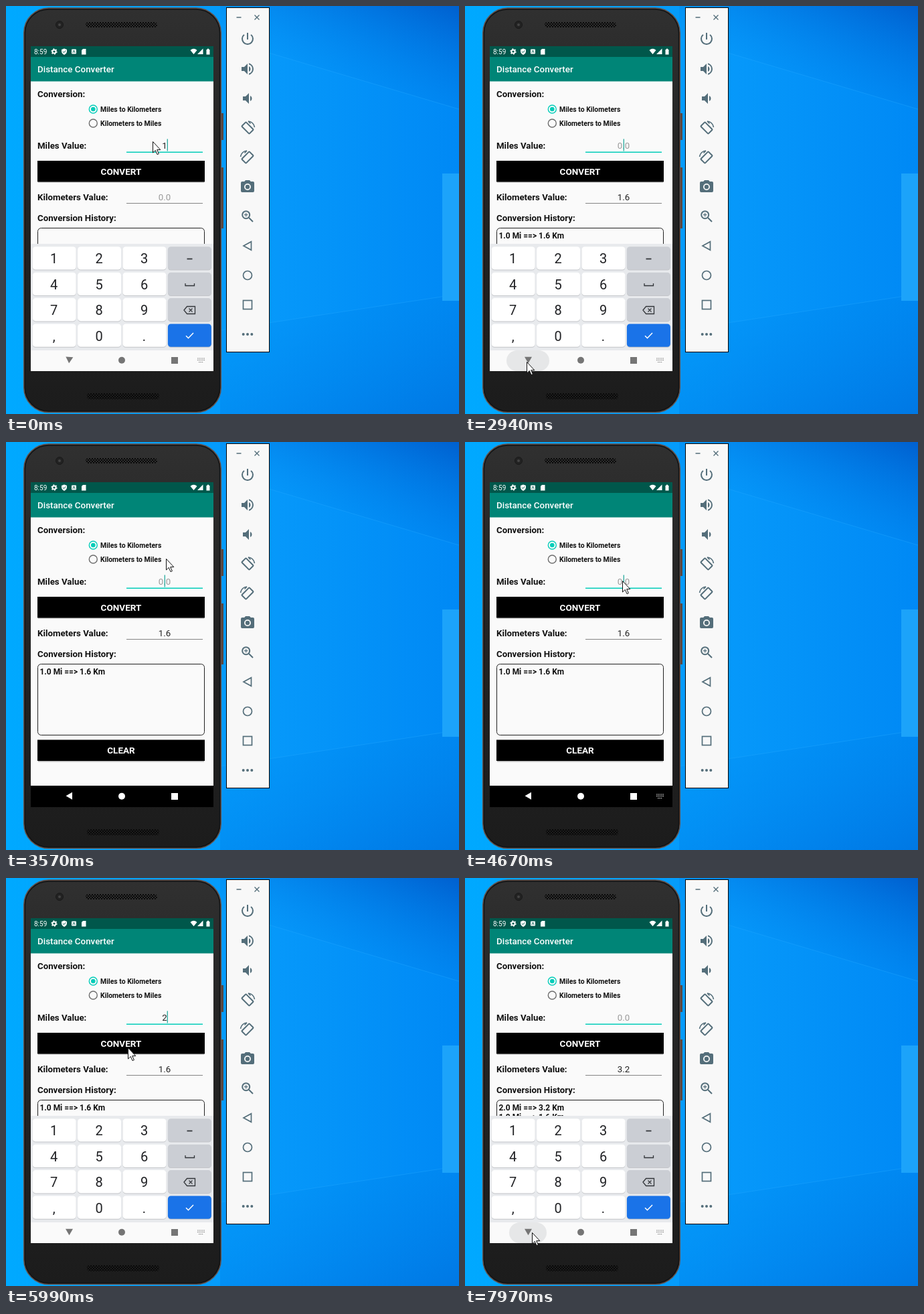
These frames come from a looping animation (677x609 px, 8 s). An HTML page:

```html
<!DOCTYPE html>
<html lang="en">
<head>
<meta charset="utf-8">
<title>Distance Converter</title>
<style>
  html, body { margin: 0; width: 100%; height: 100%; overflow: hidden; background: #0892f8; }
  svg { display: block; font-family: Roboto, sans-serif; }
  .label { font-weight: 700; font-size: 13.28px; fill: #111; }
  .option { font-weight: 700; font-size: 10.45px; fill: #111; }
  .entry { font-weight: 700; font-size: 11.95px; fill: #111; }
  .button { font-weight: 700; font-size: 13.5px; fill: #fff; text-anchor: middle; }
  .value { font-size: 13.28px; text-anchor: middle; }
  .key { font-size: 20px; fill: #202124; text-anchor: middle; }
  .line { fill: none; stroke: #546e7a; stroke-width: 2; }
</style>
</head>
<body>
<svg width="677" height="609" viewBox="0 0 677 609">
  <defs>
    <linearGradient id="sky"><stop stop-color="#00a9ff"/><stop offset=".6" stop-color="#0698fa"/><stop offset="1" stop-color="#0089f5"/></linearGradient>
    <linearGradient id="dusk" x1="0" y1="1" x2="1" y2="0"><stop offset=".3" stop-color="#0088f0" stop-opacity="0"/><stop offset="1" stop-color="#0060cf"/></linearGradient>
    <linearGradient id="floor" x1="0" y1="0" x2="1" y2="1"><stop stop-color="#0094f8" stop-opacity=".2"/><stop offset="1" stop-color="#0078e4"/></linearGradient>
    <linearGradient id="shell" x2="0" y2="1"><stop stop-color="#303030"/><stop offset=".3" stop-color="#262626"/><stop offset="1" stop-color="#1c1c1c"/></linearGradient>
    <pattern id="mesh" width="4" height="4" patternUnits="userSpaceOnUse"><path d="M0 0h2v2H0zM2 2h2v2H2z" fill="#090909"/></pattern>
  </defs>

  <!-- desktop -->
  <rect width="677" height="609" fill="url(#sky)"/>
  <path d="M320 0H677V154L393 70 320 48z" fill="url(#dusk)"/>
  <path d="M320 484L677 430V609H320z" fill="url(#floor)"/>
  <path d="M393 70L677 154M320 484L677 430" stroke="#25a8ff" stroke-opacity=".4"/>
  <rect x="652" y="250" width="190" height="190" fill="#1ca3fa"/>

  <!-- phone -->
  <path d="M320 160h5v40h-5zM320 241h5v91h-5z" fill="#594742"/>
  <rect x="26.7" y="3" width="294.6" height="603.5" rx="37" fill="url(#shell)" stroke="#63534e" stroke-width="1.5"/>
  <rect x="28.5" y="5" width="291" height="599.5" rx="35" fill="none" stroke="#141414" stroke-width="1.5"/>
  <circle cx="80" cy="28" r="5.5" fill="#222" stroke="#191919"/><circle cx="80" cy="28" r="2" fill="#444"/>
  <g fill="url(#mesh)"><rect x="119" y="24" width="107" height="8" rx="4"/><rect x="121" y="578" width="108" height="9" rx="4"/></g>

  <!-- app -->
  <rect x="37" y="60" width="273" height="485" fill="#fafafa"/>
  <rect x="37" y="60" width="273" height="16" fill="#00574b"/>
  <rect x="37" y="76" width="273" height="36.5" fill="#008577"/>
  <g fill="#fff">
    <text x="42" y="71.7" font-size="10">8:59</text>
    <circle cx="72" cy="68" r="2.6" fill="none" stroke="#fff" stroke-width="2"/>
    <circle cx="72" cy="68" r="4" fill="none" stroke="#fff" stroke-width="1.3" stroke-dasharray="1.8 2.39"/>
    <path d="M87 63.5l4 1.5v3c0 2-2 4-4 5-2-1-4-3-4-5v-3z"/><path d="M85 68l1.5 1.5 2.8-3" fill="none" stroke="#00574b"/>
    <rect x="98" y="64.5" width="7" height="7" rx="1"/><path d="M99.8 70l1.7-4 1.7 4" fill="none" stroke="#00574b" stroke-width=".9"/>
    <path d="M115 64h4.5v8.5h-6.5v-6.5z"/>
    <path d="M275.5 66q5-4.5 10 0l-5 6zM294.500 63.500v8.500h-8.500zM299.500 65h1.300v-1.200h2.400v1.200h1.300v7.500h-5z"/>
    <text x="47" y="99.300" font-size="13.400" font-weight="500">Distance Converter</text>
  </g>
  <text class="label" x="47" y="136">Conversion:</text>
  <circle cx="130.300" cy="154" r="6" fill="none" stroke="#03cdb9" stroke-width="1.400"/><circle cx="130.300" cy="154" r="3.300" fill="#03cdb9"/>
  <circle cx="130.300" cy="175" r="6" fill="none" stroke="#6d6d6d" stroke-width="1.400"/>
  <text class="option" x="141" y="157.700">Miles to Kilometers</text>
  <text class="option" x="141" y="178.800">Kilometers to Miles</text>
  <text class="label" x="47" y="213">Miles Value:</text>
  <text class="label" x="47" y="289.800">Kilometers Value:</text>
  <text class="label" x="47" y="321">Conversion History:</text>
  <path d="M180 218.300h114" stroke="#03cdb9" stroke-width="1.500"/>
  <path d="M180 294.500h114" stroke="#858585"/>
  <text class="value" id="miles" x="237" y="213"/>
  <rect id="caret" y="198.500" width="1.400" height="18" fill="#35afa4"/>
  <text class="value" id="kilometers" x="237" y="289.800"/>
  <path id="shadow" d="M48 262h248v1.500H48z" fill="#bbb"/>
  <rect x="47" y="231" width="250" height="31.500"/><text class="button" x="172" y="251.500">CONVERT</text>
  <rect x="47.500" y="331.500" width="249" height="106" rx="5" fill="none" stroke="#222"/>
  <text class="entry" x="50.500" y="347.300" id="newest"/><text class="entry" x="50.500" y="360.800" id="older"/>
  <path d="M48 476h248v1.500H48z" fill="#bbb"/>
  <rect x="47" y="444.500" width="250" height="31.500"/><text class="button" x="172" y="465">CLEAR</text>

  <!-- keyboard -->
  <g id="keyboard">
    <rect x="37" y="355" width="273" height="160" fill="#e8eaed"/>
    <g id="keys"/>
    <g fill="none" stroke="#33363a" stroke-width="1.300">
      <path d="M270.500 377.500h8" stroke-width="1.800"/>
      <path d="M268 414v3.500h13.500v-3.500"/>
      <path d="M266 454l4.500-5.500h12v11h-12zM273.500 451.500l5 5m0-5l-5 5"/>
      <path d="M269 492.300l3.500 3.500 7.500-7.800" stroke="#fff" stroke-width="1.500"/>
    </g>
  </g>
  <rect id="navbar" x="37" width="273"/>
  <rect id="ripple" y="514" height="31" rx="16" fill="#e6e7e8"/>
  <g id="nav">
    <path id="back" d="M-5.500-4.500h11L0 5z"/>
    <circle cx="173" cy="528.700" r="5"/><rect x="247" y="524" width="10" height="10"/>
    <path id="switcher" d="M286 526h11M286 528.500h11M288 531.500h7" fill="none" stroke-width="1.200" stroke-dasharray="1.400 1"/>
  </g>

  <!-- emulator toolbar -->
  <rect x="329.500" y="2.500" width="64" height="514" fill="#f8f8f8" stroke="#000"/>
  <path class="line" style="stroke-width:1.400" d="M344.500 17h7M371.500 13.500l7 7m0-7l-7 7"/>
  <g fill="#546e7a">
    <path transform="translate(349 37)" d="M13 3h-2v10h2zm4.830 2.170l-1.420 1.420A7 7 0 1 1 7.580 6.580L6.170 5.170a9 9 0 1 0 11.660 0z"/>
    <path transform="translate(349 82)" d="M3 9v6h4l5 5V4L7 9zm13.500 3c0-1.770-1-3.300-2.500-4v8c1.500-.7 2.500-2.250 2.500-4zM14 3.230v2.060a7 7 0 0 1 0 13.420v2.060a9 9 0 0 0 0-17.540z"/>
    <path transform="translate(349 126)" d="M18.500 12c0-1.770-1-3.300-2.500-4v8c1.500-.7 2.500-2.250 2.500-4zM5 9v6h4l5 5V4L9 9z"/>
    <path transform="translate(349 258)" fill-rule="evenodd" d="M9 2L7.170 4H4a2 2 0 0 0-2 2v12a2 2 0 0 0 2 2h16a2 2 0 0 0 2-2V6a2 2 0 0 0-2-2h-3.170L15 2zM7 12a5 5 0 0 1 10 0 5 5 0 0 1-10 0z"/>
    <circle cx="361" cy="270" r="3.200"/>
    <circle cx="354.700" cy="490" r="2"/><circle cx="361" cy="490" r="2"/><circle cx="367.300" cy="490" r="2"/>
  </g>
  <g class="line">
    <g id="turn"><rect x="-4.500" y="-8" width="9" height="16" rx="1" transform="rotate(-45)"/><path d="M1-10q8 1 9.500 9M1-10l3.500 3.500" stroke-width="1.600"/></g>
    <circle cx="358.700" cy="311.700" r="5.500"/><path d="M363 316l6 6"/><path d="M356 311.700h5.400m-2.700-2.700v5.400" stroke-width="1.200"/>
    <path d="M355 358l11.500-6.300v12.600z" stroke-width="1.700"/>
    <circle cx="361" cy="402" r="6.500" stroke-width="1.700"/><rect x="354.500" y="439.500" width="13" height="13" stroke-width="1.700"/>
  </g>

  <path id="cursor" d="M.5.500v16.500l3.800-3.600 2.700 6.200 2.400-1-2.700-6h5.100z" fill="#fff" stroke="#111"/>
</svg>
<script>
const LOOP = 8000;
const $ = id => document.getElementById(id);
const set = (id, attrs) => { for (const name in attrs) $(id).setAttribute(name, attrs[name]); };
const show = (id, on) => set(id, { visibility: on ? 'visible' : 'hidden' });

// Latest [time, ...values] entry that has started.
const at = (steps, t) => steps.findLast(step => step[0] <= t);

const POINTER = [
  [0, 219, 202], [640, 212, 207], [760, 206, 213], [910, 182, 237], [1030, 174, 244],
  [1850, 82, 484], [1970, 75, 520], [2090, 73, 536], [2240, 80, 535], [2390, 90, 532], [2510, 92, 531],
  [3450, 165, 400], [3570, 239, 174], [3720, 247, 155], [3840, 245, 170], [3990, 236, 203], [4140, 235, 207],
  [5060, 244, 208], [5570, 235, 208], [5720, 210, 228], [5850, 189, 246], [5990, 182, 253],
  [7030, 139, 431], [7180, 130, 562], [7300, 124, 555], [7450, 113, 540], [7570, 104, 531], [7690, 100, 529]
];
const BLINKS = [490, 1030, 2090, 2510, 3060, 3570, 3990, 4520, 5060, 5990, 7030, 7450, 7970];
const TYPED = [[0, '1'], [1580, ''], [5570, '2'], [6470, '']];
const RESULT = [[0, ''], [1580, '1.6'], [6470, '3.2']];
const KEYBOARD = [[0, 0], [3060, 14], [3180, null], [4820, 14], [4940, 1], [5060, 0]];
const BACK_TURN = [[0, 4], [120, 0], [3060, 35], [3180, 78], [3330, 90], [4820, 55], [4940, 18], [5060, 3], [5570, 0]];
const RIPPLE = [[0, 0], [2940, 64], [3180, 0], [7970, 56]];

function buildKeys() {
  const labels = '123 456 789 ,0. ';
  $('keys').innerHTML = [...labels].map((label, i) => {
    const col = i % 4, row = i >> 2;
    const x = 39.7 + col * 67.4, y = 359.3 + row * 38.4;
    const fill = col < 3 ? '#fff' : row < 3 ? '#cbced4' : '#1a73e8';
    const key = (dy, color) => `<rect x="${x}" y="${y + dy}" width="65" height="34.3" rx="4.500" fill="${color}"/>`;
    return key(1, '#c3c5c9') + key(0, fill) +
      `<text class="key" x="${x + 32}" y="${y + 25}">${label}</text>`;
  }).join('');
}

function buildTurnIcons() {
  const icon = $('turn');
  const mirrored = icon.cloneNode(true);
  icon.setAttribute('transform', 'translate(361 182)');
  mirrored.removeAttribute('id');
  mirrored.setAttribute('transform', 'translate(361 226) scale(-1 1)');
  icon.after(mirrored);
}

function setValue(id, value) {
  $(id).textContent = value || '0.0';
  set(id, { fill: value ? '#222' : '#9a9a9a' });
}

function render(t) {
  const [, x, y] = at(POINTER, t);
  set('cursor', { transform: `translate(${x} ${y})` });

  const typed = at(TYPED, t)[1];
  setValue('miles', typed);
  setValue('kilometers', at(RESULT, t)[1]);
  set('caret', { x: typed ? 240.6 : 236.6 });
  // Typing resynchronises the blink, so the phase flips at 5570 are already in the list.
  show('caret', BLINKS.filter(time => time <= t).length % 2 === 0);

  const first = '1.0 Mi ==> 1.6 Km';
  $('newest').textContent = t < 1580 ? '' : t < 6470 ? first : '2.0 Mi ==> 3.2 Km';
  $('older').textContent = t < 6470 ? '' : first;

  const offset = at(KEYBOARD, t)[1], open = offset !== null;
  show('keyboard', open);
  set('keyboard', { transform: `translate(0 ${offset || 0})` });
  set('navbar', { y: open ? 514 : 513, height: open ? 31 : 32, fill: open ? '#fafafa' : '#000' });
  const ink = open ? '#757575' : '#fff';
  set('nav', { fill: ink });
  set('switcher', { stroke: ink });
  show('switcher', open || t >= 4670);
  set('back', { transform: `translate(94.5 528.3) rotate(${at(BACK_TURN, t)[1]})` });

  const width = at(RIPPLE, t)[1];
  set('ripple', { x: 94 - width / 2, width });
  const pressed = (t >= 1460 && t < 1580) || (t >= 6350 && t < 6470);
  set('shadow', { fill: pressed ? '#888' : '#bbb' });
}

function tick(now) {
  render(now % LOOP);
  requestAnimationFrame(tick);
}

buildKeys();
buildTurnIcons();
render(0);
requestAnimationFrame(tick);
</script>
</body>
</html>
```
